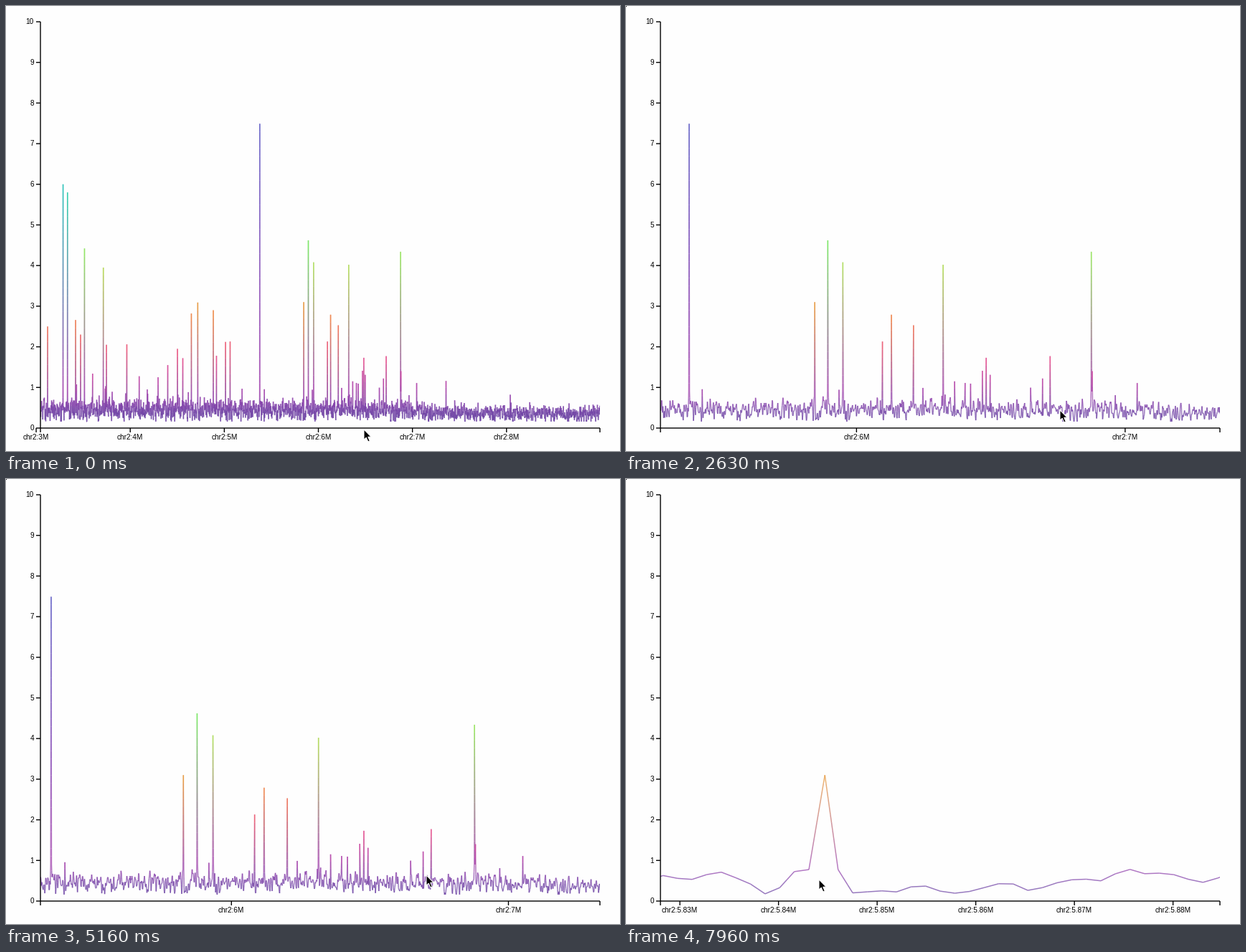
Write a matplotlib script that moves like this. It is 856 px wide and 621 px high and loops after 8 s.

```python
import numpy as np
import matplotlib.pyplot as plt
from matplotlib.animation import FuncAnimation
from matplotlib.collections import LineCollection
from matplotlib.patches import Polygon, Rectangle

W, H, DPI = 856, 621, 100
PX = 72 / DPI                       # points per pixel
LEFT, RIGHT, TOP, BASE = 48, 828, 22, 589
UNIT = (BASE - TOP) / 10
FRAMES, STEP = 160, 50

plt.rcParams["font.family"] = "Liberation Sans"

# The tall peaks: position in Mb, height
PEAKS = [
    (3.122, 2.5), (3.286, 6.0), (3.333, 5.8), (3.419, 2.66), (3.472, 2.3),
    (3.514, 4.42), (3.6, 1.34), (3.714, 3.95), (3.747, 2.05), (3.964, 2.06),
    (4.296, 1.25), (4.399, 1.55), (4.502, 1.95), (4.559, 1.72), (4.65, 2.82),
    (4.718, 3.09), (4.883, 2.9), (4.917, 1.78), (5.013, 2.12), (5.062, 2.13),
    (5.377, 7.49), (5.8447, 3.1), (5.8932, 4.62), (5.9492, 4.08),
    (6.0966, 2.13), (6.1299, 2.79), (6.2122, 2.53), (6.3224, 4.02),
    (6.3652, 1.15), (6.4042, 1.11), (6.4684, 1.41), (6.4828, 1.73),
    (6.4975, 1.31), (6.6925, 1.22), (6.7208, 1.77), (6.874, 4.34),
    (6.8775, 1.4),
]

# Zoom phases: end time, fixed pixel, Mb there, times, pixels per Mb
PHASES = [
    (2700, 497, 6.469, [200, 930, 1000, 1700, 2000, 2500],
     [131.15, 1150, 1150, 3740, 3740, 374.5]),
    (6000, 588, 6.7088, [2950, 4090, 4300, 5180], [374.5, 7643, 7643, 368]),
    (9000, 269, 5.8441, [6760, 7960], [368, 13750]),
]

# Pointer path: time, x, y
POINTER = np.array([
    (80, 499, 591), (350, 496, 553), (2480, 496, 553), (2600, 605, 564),
    (2680, 605, 564), (2900, 586, 553), (5200, 586, 553), (5400, 697, 510),
    (5750, 92, 200), (6030, 434, 494), (6360, 434, 494), (6560, 269, 559),
])


def make_signal():
    rng = np.random.default_rng(12)
    x = np.arange(3, 9.01, 0.00148)
    noise = np.convolve(rng.normal(size=x.size), [0.35, 0.85, 0.35], "same")
    level = np.interp(x, [6.8, 7.5], [0.45, 0.36])
    v = np.clip(level * (1 + 0.28 * noise), 0.16, 1)
    bump = rng.random(x.size) < np.where(x < 7.2, 0.02, 0.004)
    v += bump * rng.exponential(0.25, x.size).clip(0, 0.6)
    for pos, top in PEAKS:
        i = np.argmin(abs(x - pos))
        x[i], v[i] = pos, top
        side = min(0.25 * top, 0.9)
        v[i - 1], v[i + 1] = max(v[i - 1], side), max(v[i + 1], side)
    return x, v


def rainbow(t):
    """Cyclic cubehelix rainbow, t in 0..1."""
    d = abs(t - 0.5)
    h = np.radians(360 * t + 20)
    s, l = 1.5 - 1.5 * d, 0.8 - 0.9 * d
    a, c, n = s * l * (1 - l), np.cos(h), np.sin(h)
    rgb = [l + a * (1.78277 * n - 0.14861 * c),
           l - a * (0.29227 * c + 0.90649 * n),
           l + a * 1.97294 * c]
    return np.clip(np.stack(rgb, axis=-1), 0, 1)


X, V = make_signal()
COLORS = 0.9 * rainbow(np.clip((V - 0.35) / 7.6, 0, 1)) + 0.05


def view(t):
    """Left edge in Mb and scale in pixels per Mb."""
    for end, pin, centre, times, scales in PHASES:
        if t < end:
            break
    scale = np.exp(np.interp(t, times, np.log(scales)))
    return centre - (pin - LEFT) / scale, scale


fig = plt.figure(figsize=(W / DPI, H / DPI), dpi=DPI, facecolor="#fefefe")
ax = fig.add_axes([0, 0, 1, 1])
ax.set_xlim(0, W)
ax.set_ylim(H, 0)
ax.axis("off")


def rule(xs, ys):
    ax.plot(xs, ys, color="black", lw=1.4 * PX, solid_capstyle="butt",
            snap=False, zorder=3)


def label(x, y, s, ha):
    return ax.text(x, y, s, ha=ha, va="baseline", fontsize=10 * PX, zorder=3)


rule([LEFT, LEFT], [TOP, BASE])
rule([LEFT, RIGHT], [BASE, BASE])
for edge in (LEFT, RIGHT):
    rule([edge, edge], [BASE, BASE + 6])
for n in range(11):
    y = BASE - n * UNIT
    rule([LEFT - 6, LEFT], [y, y])
    label(LEFT - 9, y + 3.2, str(n), "right")

trace = LineCollection([], linewidths=1.5 * PX, alpha=0.72, capstyle="butt",
                       zorder=2)
ax.add_collection(trace, autolim=False)
trace.set_clip_path(Rectangle((LEFT, 0), RIGHT - LEFT, H,
                              transform=ax.transData))
ticks = LineCollection([], colors="black", linewidths=1.4 * PX, zorder=3)
ticks.set_snap(False)
ax.add_collection(ticks, autolim=False)
names = [label(0, BASE + 16.1, "", "center") for _ in range(12)]

dot = ax.add_patch(Rectangle((0, 0), 1.5, 1.2, fc="black", lw=0))
ARROW = np.array([(0, 0), (0, 14.2), (3.2, 11.2), (5.8, 17), (8.2, 16),
                  (5.7, 10.3), (10, 10.2)])
pointer = ax.add_patch(Polygon(ARROW, fc="black", ec="white", lw=PX, zorder=5))


def draw_trace(left, scale):
    a = max(np.searchsorted(X, left) - 1, 0)
    b = np.searchsorted(X, left + (RIGHT - LEFT) / scale) + 1
    pts = np.c_[LEFT + (X[a:b] - left) * scale, BASE - V[a:b] * UNIT]
    col = COLORS[a:b]
    # Steep segments are cut into pieces for a smooth colour blend
    parts = 1 + (abs(np.diff(V[a:b])) / 0.2).astype(int)
    seg = np.repeat(np.arange(parts.size), parts)
    k = np.arange(seg.size) - np.repeat(np.cumsum(parts) - parts, parts)
    n = parts[seg]

    def blend(arr, f):
        return arr[seg] + (arr[seg + 1] - arr[seg]) * f[:, None]

    trace.set_segments(np.stack([blend(pts, k / n), blend(pts, (k + 1) / n)],
                                axis=1))
    trace.set_color(blend(col, (k + 0.5) / n))


def draw_axis(left, scale):
    span = (RIGHT - LEFT) / scale
    power = int(np.floor(np.log10(span)))
    step = 10.0 ** power
    first = int(np.ceil((left - 8 / scale) / step))
    marks = []
    for i, name in enumerate(names):
        value = (first + i) * step
        x = LEFT + (value - left) * scale
        shown = x <= RIGHT + 0.5
        name.set_visible(shown)
        if shown:
            name.set_text(f"chr2:{round(value, max(-power, 0)):g}M")
            name.set_x(x)
            marks.append([(x, BASE), (x, BASE + 6)])
    ticks.set_segments(marks)


def update(i):
    t = i * STEP + 10
    draw_trace(*view(t))
    draw_axis(*view(t + 6))         # the axis runs slightly ahead of the line
    x, y = (np.interp(t, POINTER[:, 0], POINTER[:, c]) for c in (1, 2))
    pointer.set_xy(ARROW + (x, y))
    dot.set_visible(i > 0)
    return trace, ticks, pointer, dot, *names


anim = FuncAnimation(fig, update, frames=FRAMES, interval=STEP, repeat=True,
                     repeat_delay=0, blit=False)
plt.show()
```
